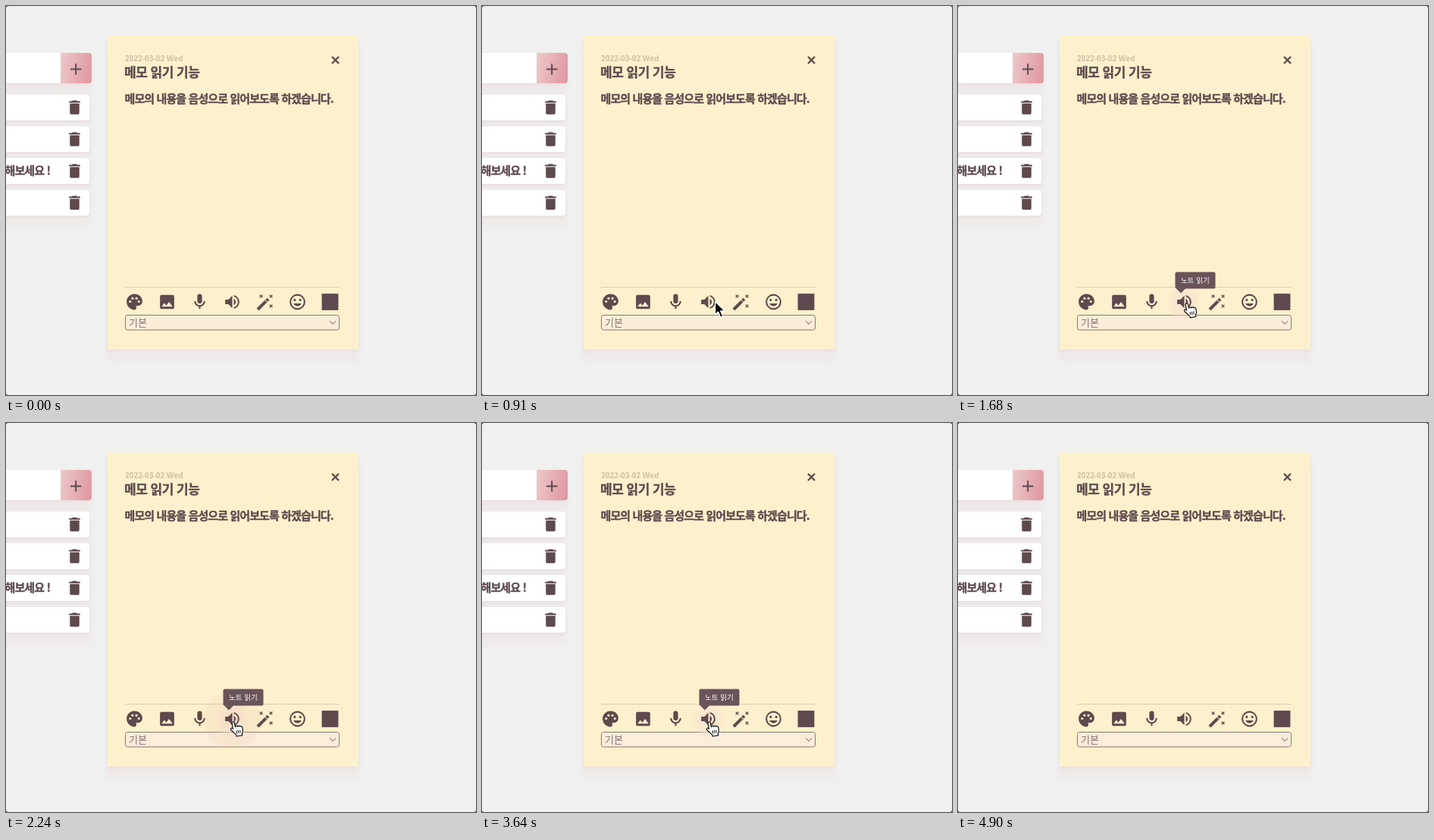
Animation of 620x514 px, one loop 5.88 s. Source, as an HTML page:

```html
<!DOCTYPE html>
<html lang="ko">
<head>
<meta charset="utf-8">
<title>메모 읽기</title>
<style>
  html, body { margin: 0; width: 100%; height: 100%; overflow: hidden; background: #f0f0f0; }
  .panel {
    position: absolute; box-sizing: border-box; background: #fff;
    box-shadow: 0 2px 4px rgba(205, 150, 156, .16), 0 15px 7px 1px rgba(235, 205, 207, .17);
  }
  .row { left: -20px; width: 130px; height: 34px; border-radius: 4px; }
  .input { left: -20px; top: 62px; width: 132px; height: 40px; border-radius: 4px; }
  .add {
    position: absolute; left: 72px; top: 62px; width: 40.5px; height: 40px;
    border-radius: 0 4px 4px 0; background: linear-gradient(100deg, #edc9cc, #e0959e);
  }
  .note { left: 134px; top: 39px; width: 331px; height: 415px; background: #fcf1cc; }
  svg { position: absolute; left: 0; top: 0; }
  text { font-family: "Noto Sans CJK KR", "Noto Sans CJK", "Noto Sans", sans-serif; fill: #5e4a4e; }
  .bold, .title { font-weight: 900; stroke: #5e4a4e; stroke-width: .35px; }
  .bold { font-size: 15px; letter-spacing: -.06em; }
  .title { font-size: 17px; letter-spacing: -.03em; }
  .date { font: 700 10px "Noto Sans", sans-serif; fill: #cfc2a8; }
  .icon { fill: #5e4a4e; }
  .line { fill: none; stroke: #5e4a4e; }
</style>
</head>
<body>
<div class="panel input"></div>
<div class="add"></div>
<div class="panel note"></div>

<svg width="620" height="514" viewBox="0 0 620 514">
  <defs>
    <radialGradient id="glow">
      <stop offset=".5" stop-color="#f8e3d0" stop-opacity=".75"/>
      <stop offset="1" stop-color="#f8e3d0" stop-opacity="0"/>
    </radialGradient>
    <path id="trash" d="M6 19c0 1.1.9 2 2 2h8c1.1 0 2-.9 2-2V7H6zM19 4h-3.5l-1-1h-5l-1 1H5v2h14z"/>
    <g id="palette">
      <path d="M12 2C6.49 2 2 6.49 2 12s4.49 10 10 10a2.5 2.5 0 0 0 1.86-4.17.5.5 0 0 1 .37-.83H16c3.31 0 6-2.69 6-6 0-4.96-4.49-9-10-9z"/>
      <g fill="#fcf1cc">
        <circle cx="6.5" cy="11.5" r="1.5"/><circle cx="9.5" cy="7.5" r="1.5"/>
        <circle cx="14.5" cy="7.5" r="1.5"/><circle cx="17.5" cy="11.5" r="1.5"/>
      </g>
    </g>
    <path id="image" d="M21 19V5c0-1.1-.9-2-2-2H5c-1.1 0-2 .9-2 2v14c0 1.1.9 2 2 2h14c1.1 0 2-.9 2-2zM8.5 13.5l2.5 3 3.5-4.5 4.5 6H5z"/>
    <path id="mic" d="M12 14c1.66 0 3-1.34 3-3V5a3 3 0 0 0-6 0v6c0 1.66 1.34 3 3 3zm5-3a5 5 0 0 1-10 0H5c0 3.53 2.61 6.43 6 6.92V21h2v-3.08c3.39-.49 6-3.39 6-6.92z"/>
    <path id="speaker" d="M3 9v6h4l5 5V4L7 9zm13.5 3c0-1.77-1-3.29-2.5-4.03v8.05c1.5-.73 2.5-2.25 2.5-4.02zM14 3.23v2.06a7 7 0 0 1 0 13.42v2.06a9 9 0 0 0 0-17.54z"/>
    <g id="wand">
      <path d="M1.8 20.2 12 10l2.500 2.500L4.300 22.700zM12.900 9.100l2-2 2.500 2.500-2 2z" stroke="#5e4a4e" stroke-width=".5" stroke-linejoin="round"/>
      <path class="line" stroke-width="1.300" d="M5.500 3l3.500 3.500m0-3.500L5.500 6.500M18 3l3.500 3.500m0-3.500L18 6.500M18 15.500l3.500 3.500m0-3.500L18 19"/>
    </g>
    <g id="smile">
      <circle class="line" cx="12" cy="12" r="9" stroke-width="2"/>
      <circle cx="8.5" cy="9.5" r="1.5"/><circle cx="15.5" cy="9.5" r="1.5"/>
      <path d="M12 17.5c2.33 0 4.31-1.46 5.11-3.5H6.89c.8 2.04 2.78 3.5 5.11 3.5z"/>
    </g>
    <rect id="square" x="1.5" y="1.5" width="21" height="21"/>
  </defs>

  <path class="line" stroke-width="2" d="M85 83.5h14.5M92.2 76.2v14.5"/>
  <path class="line" stroke-width="2.4" d="M430 67l9 9m0-9-9 9"/>
  <text class="bold" x="-1.5" y="223">해보세요 !</text>
  <text class="date" x="157" y="73">2022-03-02 Wed</text>
  <text class="title" x="156" y="94">메모 읽기 기능</text>
  <text class="bold" x="156.5" y="128">메모의 내용을 음성으로 읽어보도록 하겠습니다.</text>

  <path d="M157 371.5h283" stroke="#d9cdb5"/>
  <rect x="157.5" y="408.5" width="282" height="19.5" rx="3" fill="#faedd9" stroke="#88777a"/>
  <text x="162" y="423" font-size="13" style="fill:#837174">기본</text>
  <path class="line" d="M427 416.3l4 4 4-4"/>

  <circle id="hover" cx="298" cy="391.5" r="25" fill="url(#glow)"/>
  <circle id="ripple" cx="298" cy="392" fill="#e9b9a5"/>
  <g id="icons" class="icon"></g>

  <g id="tip">
    <path d="M288.5 351.5h49a2 2 0 0 1 2 2v18a2 2 0 0 1-2 2H300l-6 6-6-6a2 2 0 0 1-1.5-2v-18a2 2 0 0 1 2-2z" fill="#69545a"/>
    <text x="294" y="366.3" font-size="9.5" font-weight="500" style="fill:#fff">노트 읽기</text>
  </g>

  <g id="arrow" stroke="#fff" stroke-width="1.2" stroke-linejoin="round">
    <path d="M0 0v17l4-3.6 3.1 7.2 3-1.3-3.1-7h5.4z"/>
  </g>
  <g id="hand">
    <g transform="rotate(-10) translate(-5.2 -.5)" stroke="#111" stroke-width="1.2" stroke-linejoin="round">
      <path fill="#fff" d="M3.5 2.2a1.7 1.7 0 0 1 3.4 0V7.5q.3-1.2 1.6-1.2t1.6 1.3q.5-.9 1.6-.8 1.2.1 1.4 1.3 1-.7 1.8-.2 1.1.5 1.1 1.9V13q0 3-1.8 4.5V20H6.5V18Q4.5 16 3 13.5L.8 10.700Q-.1 9 1.3 8.3 2.5 8 3.5 9.5z"/>
      <path d="M7.7 12.5v4M10 12.5v4M12.3 12.5v4" stroke-width="1"/>
    </g>
  </g>
  <path fill="#555" d="M0 0h2L0 2zM620 0h-2l2 2zM0 514h2l-2-2zM620 514h-2l2-2z"/>
</svg>

<script>
  const LOOP = 5880, STEP = 70;
  const $ = id => document.getElementById(id);
  const clamp = v => Math.min(1, Math.max(0, v));
  const progress = (t, start, duration) => clamp((t - start) / duration);
  const easeOut = k => 1 - (1 - k) ** 3;
  const fade = (t, start, end) => progress(t, start, 210) - progress(t, end, 210);

  function addIcon(name, cx, cy) {
    const use = document.createElementNS('http://www.w3.org/2000/svg', 'use');
    use.setAttribute('href', '#' + name);
    use.setAttribute('transform', `translate(${cx} ${cy}) scale(1.04) translate(-12 -12)`);
    $('icons').append(use);
  }

  function addRow(top) {
    const row = document.createElement('div');
    row.className = 'panel row';
    row.style.top = top + 'px';
    document.body.insertBefore(row, document.querySelector('svg'));
    addIcon('trash', 90.5, top + 17);
  }

  ['palette', 'image', 'mic', 'speaker', 'wand', 'smile', 'square']
    .forEach((name, i) => addIcon(name, 169.5 + 43 * i, 391));
  for (let i = 0; i < 4; i++) addRow(117 + 42 * i);

  const entry = { x: 398, y: 504 };
  const moves = [
    { at: 0, for: 350, x: 376, y: 474 },
    { at: 490, for: 140, x: 321, y: 404 },
    { at: 840, for: 210, x: 302, y: 385 },
    { at: 1610, for: 140, x: 301.5, y: 394 },
    { at: 1890, for: 70, x: 299.5, y: 395 },
    { at: 3640, for: 560, x: 419, y: 333 },
    { at: 4690, for: 210, x: 405, y: 480 }
  ];

  function pointerAt(t) {
    return moves.reduce((p, move) => {
      const k = easeOut(progress(t, move.at, move.for));
      return { x: p.x + (move.x - p.x) * k, y: p.y + (move.y - p.y) * k };
    }, entry);
  }

  function show(id, visible, { x, y }) {
    $(id).style.display = visible ? '' : 'none';
    $(id).setAttribute('transform', `translate(${x} ${y})`);
  }

  function draw(now) {
    const t = Math.floor((now % LOOP) / STEP) * STEP;
    const pointer = pointerAt(t);
    const pointing = t >= 1190 && t < 3710;
    const press = progress(t, 2030, 350);
    show('hand', pointing, pointer);
    show('arrow', !pointing && t >= 70 && t < 4900, pointer);
    $('tip').style.opacity = fade(t, 1190, 3710);
    $('hover').style.opacity = fade(t, 1120, 3640);
    $('ripple').setAttribute('r', 40 * easeOut(press));
    $('ripple').style.opacity = .35 * (1 - press);
  }

  const start = performance.now();
  function tick() {
    draw(performance.now() - start);
    requestAnimationFrame(tick);
  }
  tick();
</script>
</body>
</html>
```
